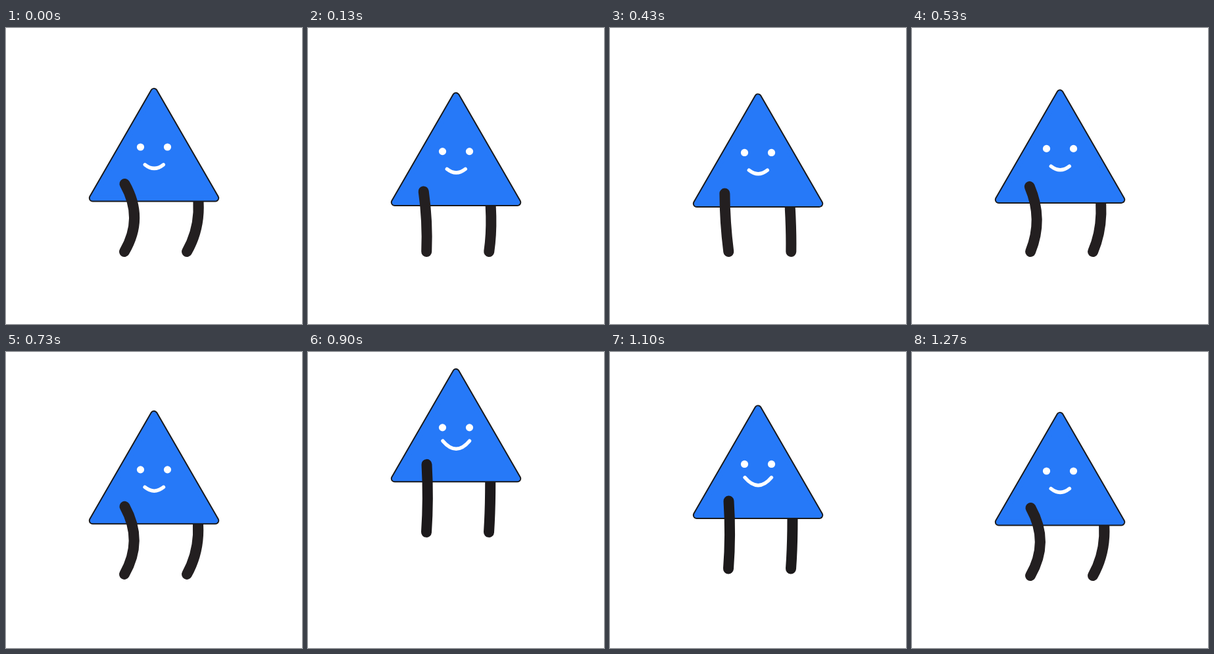
An HTML page that plays this animation: 450x450 px, repeating every 1310 ms.

```html
<!DOCTYPE html>
<html lang="en">
<head>
<meta charset="utf-8">
<title>Jumping triangle</title>
<style>
  html, body { margin: 0; width: 100%; height: 100%; overflow: hidden; background: #fff; }
  svg { display: block; width: 100vw; height: 100vh; }
  .leg, #mouth { fill: none; stroke-linecap: round; }
  .leg { stroke-width: 16; }
  #mouth { stroke: #fff; stroke-width: 5.4; }
  .tri { stroke-linejoin: round; }
</style>
</head>
<body>
<svg viewBox="0 0 450 450">
  <g id="all">
    <path id="right" class="leg"/>
    <g id="body">
      <path class="tri" d="M225 97 318.2 258.5H131.8Z" fill="#1a1a1c" stroke="#1a1a1c" stroke-width="12"/>
      <path class="tri" d="M225 97 318.2 258.5H131.8Z" fill="#2679f8" stroke="#2679f8" stroke-width="8"/>
      <circle cx="204.5" cy="181" r="5.6" fill="#fff"/>
      <circle cx="245.5" cy="181" r="5.6" fill="#fff"/>
      <path id="mouth"/>
    </g>
    <path id="left" class="leg"/>
  </g>
</svg>
<script>
const LOOP = 1310, FPS = 30, LAST = 38;
const el = id => document.getElementById(id);
const all = el('all'), body = el('body'), mouth = el('mouth');

// Each curve: start x, y, control x, y, end x, y
const LEGS = {
  left: {
    rest: [180.5, 237, 210, 289, 180, 340],
    crouch: [170, 262, 149, 300, 180.5, 340],
    straight: [180.5, 237, 181.5, 289, 180, 340]
  },
  right: {
    rest: [282, 212, 306.5, 285, 275, 340],
    crouch: [262, 237, 254, 297, 275.5, 340],
    straight: [276, 212, 276.5, 285, 275, 340]
  }
};
const SMILE = [211.3, 207.8, 225.3, 219, 239.3, 207.8];
const GRIN = [204.5, 200.8, 225.2, 225.8, 246, 200.8];
const INK = [35, 31, 32], INK_AIR = [27, 25, 27];

const mix = (a, b, k) => a.map((v, i) => v + (b[i] - v) * k);
const curve = p => `M${p[0]} ${p[1]}Q${p.slice(2).join(' ')}`;
const span = (t, a, b) => Math.min(1, Math.max(0, (t - a) / (b - a)));
const smooth = s => s * s * (3 - 2 * s);

// Cubic easing with flat ends and handles at x1 and x2
function ease(s, x1, x2) {
  let lo = 0, hi = 1;
  for (let i = 0; i < 30; i++) {
    const u = (lo + hi) / 2, v = 1 - u;
    if (3 * x1 * u * v * v + 3 * x2 * u * u * v + u * u * u < s) lo = u;
    else hi = u;
  }
  return smooth((lo + hi) / 2);
}

function draw(t) {
  const crouch = smooth(span(t, 0, 283)) - smooth(span(t, 283, 620));
  const rise = ease(span(t, 705, 990), 0.37, 0.2);
  const fall = ease(span(t, 990, 1133), 1, 0.55);
  const settle = smooth(span(t, 1133, 1266));
  const air = rise - smooth(span(t, 1060, 1285));

  all.setAttribute('transform', `translate(0 ${-71 * rise + 79 * fall - 8 * settle})`);
  body.setAttribute('transform', `translate(0 ${14.5 * crouch})`);
  mouth.setAttribute('d', curve(mix(SMILE, GRIN, air)));

  const ink = `rgb(${mix(INK, INK_AIR, air).map(Math.round)})`;
  for (const id in LEGS) {
    const { rest, crouch: low, straight } = LEGS[id];
    const leg = el(id);
    leg.setAttribute('d', curve(mix(mix(rest, low, crouch), straight, air)));
    leg.setAttribute('stroke', ink);
  }
}

// Steps at 30 per second, on 10 ms ticks
function tick(now) {
  const ticks = Math.floor((now % LOOP) / 10) * 10;
  const step = Math.min(LAST, Math.floor((ticks + 4) * FPS / 1000));
  draw(step * 1000 / FPS);
  requestAnimationFrame(() => tick(performance.now() - start));
}

const start = performance.now();
tick(0);
</script>
</body>
</html>
```
